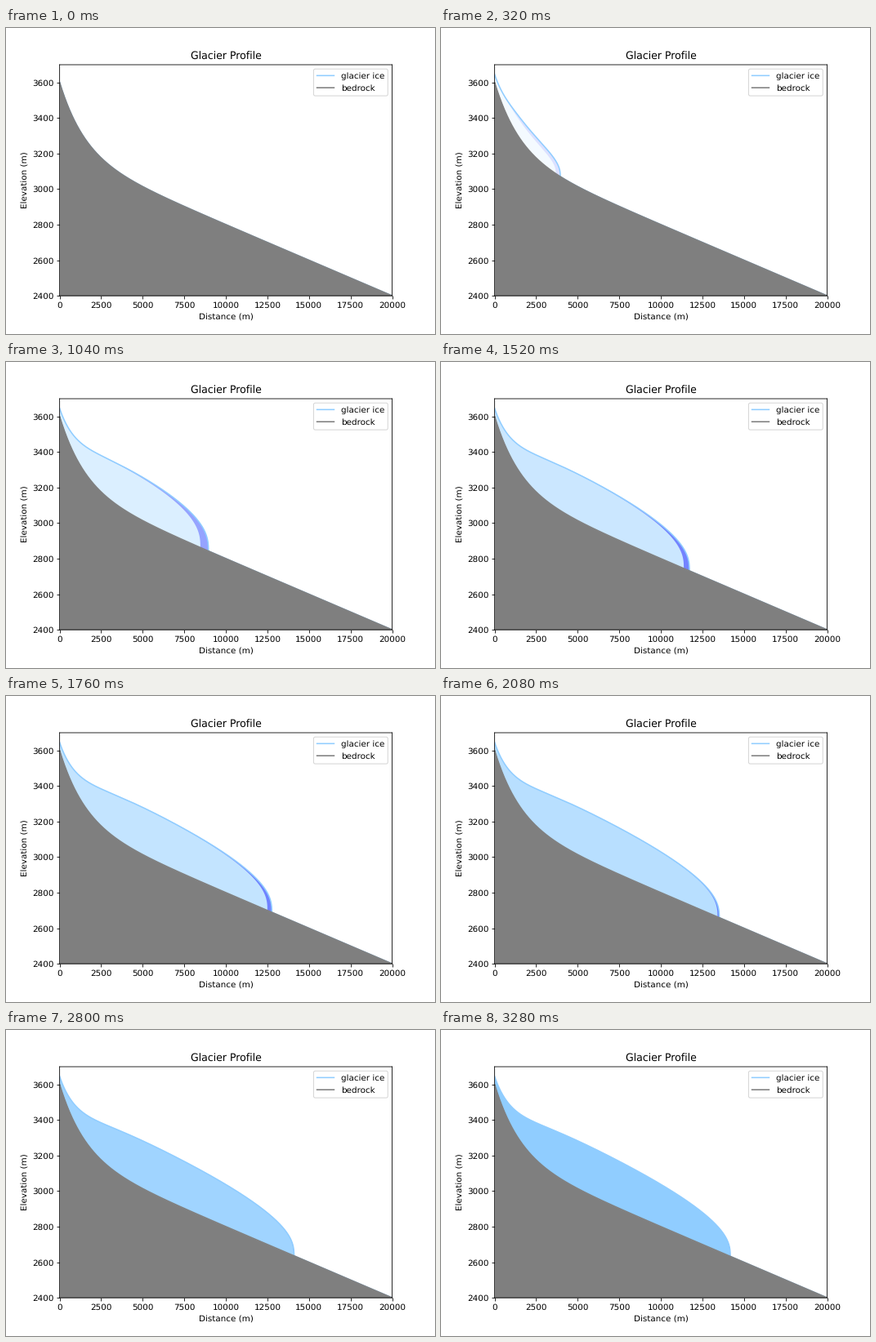
Recreate the animation shown at these times as a matplotlib script. Size 525 px wide and 375 px high, loop 3.36 s.

```python
import numpy as np
import matplotlib.pyplot as plt
from matplotlib.animation import FuncAnimation

FRAMES = 42
STEP_MS = 80
ICE = "#90cdff"
ROCK = "#7f7f7f"
FLOOR = 2400

# Unsnapped lines and unhinted glyphs give a soft, evenly scaled look
plt.rcParams.update({"font.family": "DejaVu Sans", "font.size": 10,
                     "path.snap": False, "text.hinting": "none"})

x = np.linspace(0, 20000, 4001)
bed = 3200 - 0.04 * x + 400 * np.exp(-x / 1500)

# Terminus position (m) at a few moments of the advance
KNOT_T = np.array([0, 4, 8, 13, 19, 22, 30, 41.0])
KNOT_L = np.array([3000, 3950, 5927, 8950, 11717, 12764, 13860, 14175.0])
KNOT_M = np.gradient(KNOT_L, KNOT_T)


def terminus(t):
    """Cubic Hermite curve through the knots."""
    i = int(np.clip(np.searchsorted(KNOT_T, t) - 1, 0, len(KNOT_T) - 2))
    h = KNOT_T[i + 1] - KNOT_T[i]
    s = (t - KNOT_T[i]) / h
    return ((1 + 2 * s) * (1 - s) ** 2 * KNOT_L[i]
            + s * (1 - s) ** 2 * h * KNOT_M[i]
            + s * s * (3 - 2 * s) * KNOT_L[i + 1]
            + s * s * (s - 1) * h * KNOT_M[i + 1])


def surface(t):
    """Ice surface elevation: thin on the steep head, blunt at the front."""
    if t <= 0:
        return bed.copy()
    steady = 289 - 243 * np.exp(-(x / 2300) ** 1.4)
    thick = steady * (1 + (steady / (35 * t)) ** 4) ** -0.25
    u = np.clip(x / terminus(t), 0, 1)
    return bed + thick * (1 - u ** 2.5) ** 0.36


def between(low, high):
    return np.column_stack([np.r_[x, x[::-1]], np.r_[high, low[::-1]]])


fig, ax = plt.subplots(figsize=(7, 5), dpi=75)
fig.subplots_adjust(left=0.125, right=0.9, bottom=0.125, top=0.88)

flat = between(bed, bed)
ice, = ax.fill(flat[:, 0], flat[:, 1], color=ICE, lw=0, zorder=1)
front, = ax.fill(flat[:, 0], flat[:, 1], color="blue", lw=0, zorder=1.1)
ice_line, = ax.plot(x, bed, color=ICE, lw=1.5, label="glacier ice", zorder=2)
ax.fill_between(x, FLOOR, bed, color=ROCK, lw=0, zorder=2.1)
ax.plot(x, bed, color=ROCK, lw=1.5, label="bedrock", zorder=2.2)

ax.set(xlim=(0, 20000), ylim=(FLOOR, 3700), title="Glacier Profile",
       xlabel="Distance (m)", ylabel="Elevation (m)")
ax.legend(loc="upper right")


def draw(k):
    top, last = surface(k), surface(k - 0.85)
    age = k / (FRAMES - 1)
    ice.set_xy(between(bed, top))
    ice.set_alpha(age)
    front.set_xy(between(last, np.maximum(top, last)))
    front.set_alpha(min(age, 0.43))
    ice_line.set_ydata(top)
    return ice, front, ice_line


anim = FuncAnimation(fig, draw, frames=FRAMES, init_func=lambda: draw(0),
                     interval=STEP_MS, repeat=True, repeat_delay=0)
plt.show()
```
